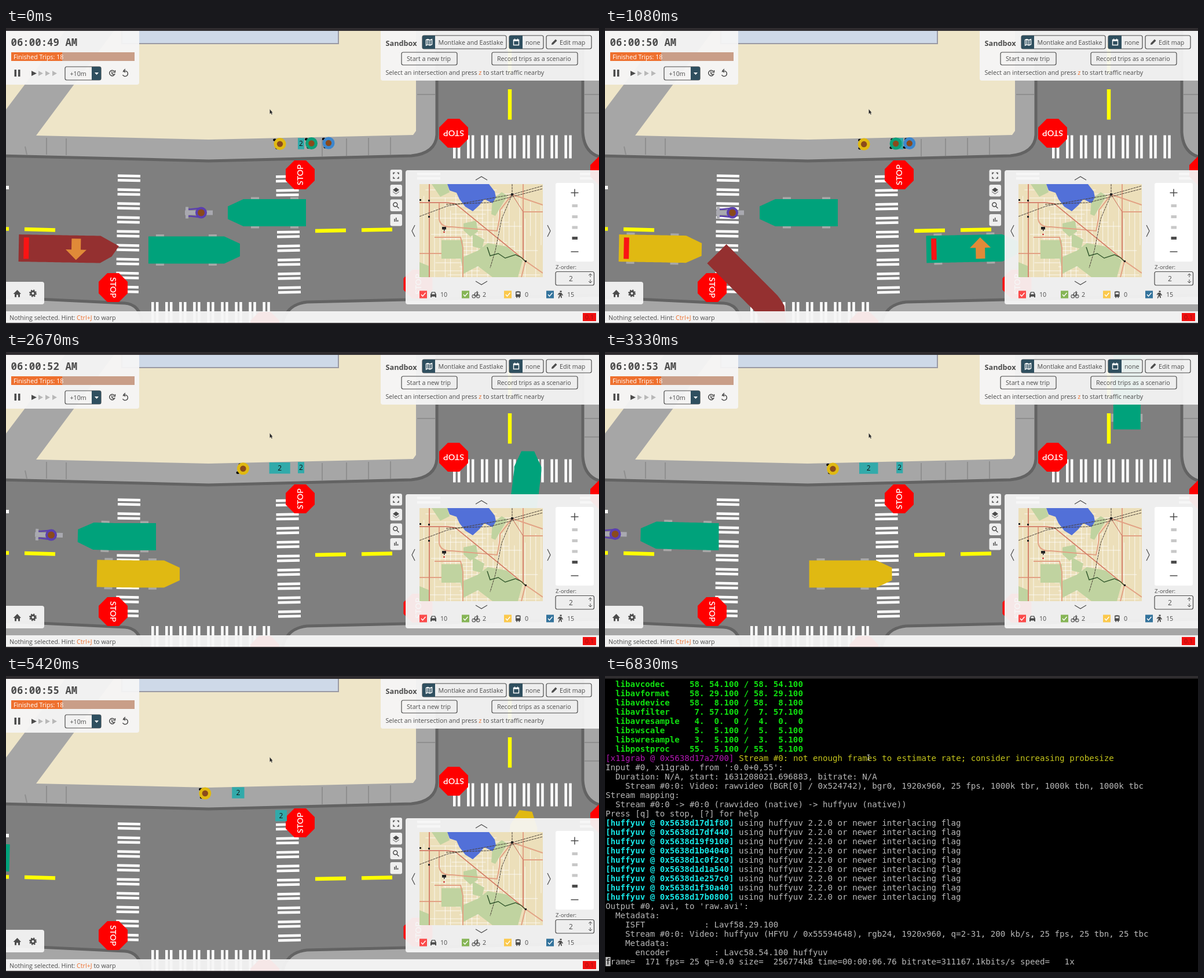
An HTML page for the animation above (7.01 s loop, 1024 by 512 pixels).

```html
<!DOCTYPE html>
<html lang="en">
<head>
<meta charset="utf-8">
<title>Traffic sandbox</title>
<style>
html, body { margin: 0; width: 100%; height: 100%; overflow: hidden; background: #000; }
svg { display: block; width: 100vw; height: 100vh; }
text { font: 10.7px "Open Sans", "Noto Sans", sans-serif; fill: #4c4c4c; white-space: pre; }
.mono { font: 600 17.4px "Noto Sans Mono", "DejaVu Sans Mono", monospace; }
.stop { font: 600 14.2px Lato, "Open Sans", sans-serif; fill: #fff; text-anchor: middle; }
.count { font-size: 12px; fill: #111; text-anchor: middle; }
.hot { fill: #ee702e; }
.panel { fill: #f6f6f6; fill-opacity: .94; }
.box { fill: none; stroke: #4c4c4c; stroke-width: 1.2; }
.teal { fill: #2f4f5f; }
.line { fill: none; stroke: #4c4c4c; stroke-width: 1.5; }
.white { fill: none; stroke: #fff; stroke-width: 1.4; }
.ink { fill: #4c4c4c; }
.walk { fill: #a6a6a6; stroke: #636363; stroke-width: 5; }
#term text { font: 14.17px "DejaVu Sans Mono", monospace; fill: #b8b8b8; }
#term .g { font-weight: 700; fill: #10e010; }
#term .c { font-weight: 700; fill: #18e6e6; }
#term .m { fill: #b218b2; }
#term .y { fill: #c4c41c; }
</style>
</head>
<body>
<svg viewBox="0 0 1024 512">
<g id="app">
  <rect width="1024" height="512" fill="#7f7f7f"/>
  <path class="walk" d="M-5 221L350 230L700 221Q742 217 744 185V-5H-5Z"/>
  <path class="walk" d="M1030 224Q998 218 996 180V-5H1030Z"/>
  <path class="walk" d="M-5 466L205 476Q235 478 236 520H-5Z"/>
  <path class="walk" d="M1030 462L520 474Q480 478 476 520H1030Z"/>
  <path d="M70 190V219M104 191V220M33 205L36 219M546 192V222M588 191V221M626 190V220M664 189V219M710 115H741M999 147H1024M999 115H1024" stroke="#8f8f8f" stroke-width="2"/>
  <path d="M187 4L52 186L350 193L703 185L708 178V4ZM0 4H103L0 141Z" fill="#eee5c8"/>
  <path d="M200 0H574V27H200Z" fill="#ced9e8" stroke="#9a9aa4" stroke-width="2"/>
  <g id="marks"></g>
  <g id="signs"></g>
  <g id="moving"></g>
  <path d="M455.500 140.500V148.500L457.300 147L458.600 149.800L459.800 149.200L458.700 146.500H460.500Z" fill="#222" stroke="#bbb" stroke-width=".3"/>

  <!-- clock and speed -->
  <path class="panel" d="M0 5H230V94Q230 98 226 98H0Z"/>
  <text id="clock" class="mono" x="8.500" y="30.500"></text>
  <rect x="9" y="42" width="213" height="15" fill="#c99e88"/>
  <rect x="9" y="42" width="88" height="15" fill="#ee702e"/>
  <text x="13" y="53.500" style="fill:#fff">Finished Trips: 18</text>
  <path class="ink" d="M14.500 72H18V84H14.500ZM21 72H24.500V84H21ZM44 74L53 78.500L44 83Z"/>
  <path d="M56 74L64 78.500L56 83ZM68 74L76 78.500L68 83ZM80 74L88 78.500L80 83Z" fill="#b8b8b8"/>
  <rect class="box" x="102" y="67" width="62" height="23" rx="3"/>
  <path class="teal" d="M148 67H161Q164 67 164 70V87Q164 90 161 90H148Z"/>
  <path d="M153 77H160L156.500 81Z" fill="#fff"/>
  <text x="110.500" y="82.500">+10m</text>
  <path class="line" d="M187 75A4.700 4.700 0 1 0 188 79M183 75V79L186 80.500M188.500 73V76.500H185M202 76A4.700 4.700 0 1 1 201.500 81M206 71L203 74L206 77"/>

  <!-- sandbox controls -->
  <path class="panel" d="M647 5H1024V91H651Q647 91 647 87Z"/>
  <text x="655.500" y="31" style="font-size:12.700px;font-weight:700">Sandbox</text>
  <g class="box">
    <rect x="719" y="13" width="145" height="23" rx="3"/><rect x="869" y="13" width="59" height="23" rx="3"/>
    <rect x="933" y="13" width="78" height="23" rx="3"/><rect x="683" y="42" width="96" height="22" rx="3"/>
    <rect x="839" y="42" width="148" height="22" rx="3"/>
  </g>
  <path class="teal" d="M741 13H722Q719 13 719 16V33Q719 36 722 36H741ZM892 13H872Q869 13 869 16V33Q869 36 872 36H892Z"/>
  <path class="white" d="M725.500 20.500L728.500 19.500L732 21L735.500 19.500V28.500L732 30L728.500 28.500L725.500 30ZM728.500 19.500V28.500M732 21V30M876.500 20.500H885.500V29.500H876.500ZM876.500 22H885.500M878.500 18.500V21M883.500 18.500V21"/>
  <path class="ink" d="M942 29L942.500 26L949 19.500L951.500 22L945 28.500Z"/>
  <text x="746.500" y="28.500">Montlake and Eastlake</text>
  <text x="897" y="28.500">none</text>
  <text x="956" y="28.500">Edit map</text>
  <text x="692" y="57">Start a new trip</text>
  <text x="848" y="57">Record trips as a scenario</text>
  <text x="655.500" y="81">Select an intersection and press <tspan class="hot">z</tspan> to start traffic nearby</text>

  <!-- map tools -->
  <g id="tools" class="panel"></g>
  <path class="line" d="M669 253V250.500H671.500M675.500 250.500H678V253M678 257.500V260H675.500M671.500 260H669V257.500M675 308.500L678.500 312M671 335V330M673.700 335V328M676.500 335V332"/>
  <circle class="line" cx="672.300" cy="305.500" r="3.500"/>
  <path class="ink" d="M673.500 276L679 280L673.500 284L668 280ZM668 282.500L673.500 286.500L679 282.500V283.500L673.500 287.500L668 283.500Z"/>

  <!-- minimap -->
  <path class="panel" d="M1024 246H694Q690 246 690 250V474Q690 478 694 478H1024Z"/>
  <clipPath id="mapBox"><rect x="714" y="270" width="213" height="161"/></clipPath>
  <g clip-path="url(#mapBox)" fill="none">
    <rect x="714" y="270" width="213" height="161" fill="#ecdfba"/>
    <path id="streets" stroke="#fff" stroke-width="1" stroke-opacity=".75"/>
    <path fill="#c0d3a0" d="M752 367H789V399H752ZM790 338L812 333L815 352L802 361L790 350ZM735 270H762L766 284L750 292ZM785 398L815 385L832 372L865 378L892 402L884 431H840L815 412L790 425ZM840 296L856 284L866 290L845 325L838 322ZM714 405L731 412V431H714ZM806 355L826 366L822 382L806 378Z"/>
    <path fill="#5270d8" d="M762 270L766 281L778 285L783 296L793 309L806 317L817 307L826 296L840 303L846 293L844 283L834 270Z"/>
    <path stroke="#e2a184" stroke-width="2" d="M714 302H762L776 304L897 403L927 424M731 270V431M893 270V400M748 302V330Q750 345 770 344L848 351Q853 330 853 315L874 288L927 306M740 362H785L789 380V431M714 390H752M893 318H927M897 403L890 431"/>
    <path stroke="#c86858" stroke-width="1" d="M714 302H762L776 304L897 403M731 270V431M874 288L893 318V400"/>
    <path stroke="#4a4038" stroke-width="1" stroke-dasharray="4 1" d="M714 326L762 308L874 288L927 273M760 305L835 302L927 278M874 270V288L856 330L845 385L836 415"/>
    <path stroke="#355a2f" stroke-width="1.500" d="M831 379L836 394L850 390L862 398L880 392L890 397L897 404"/>
    <path fill="#222" d="M714 296H717V299H714ZM729 297H732V300H729ZM729 325H732V328H729ZM872 286H876V290H872ZM896 402H899V405H896ZM753 344H760V348.500H757.500V351H756V348.500H753Z"/>
    <circle id="agent" cx="756.500" r="1.300" fill="#c62020"/>
  </g>
  <path class="line" style="stroke-width:1.200" d="M811 263L821 257L831 263M811 438L821 444L831 438M706 341L701 351L706 361M935 341L940 351L935 361"/>
  <rect x="949" y="268" width="66" height="136" rx="3" fill="#fff"/>
  <path class="line" d="M975.500 285H988.500M982 278.500V291.500M975.500 387H988.500"/>
  <path fill="#c8c8c8" d="M977.500 305H987V310H977.500ZM977.500 324H987V329H977.500ZM977.500 342.500H987V347.500H977.500Z"/>
  <path class="ink" d="M977.500 361H987V366H977.500Z"/>
  <text x="949" y="417" style="font-size:9.700px">Z-order:</text>
  <rect class="box" x="949" y="421.500" width="66.500" height="23.500" rx="3"/>
  <text x="972" y="437.500" style="font-size:12px">2</text>
  <path class="line" style="stroke-width:1" d="M1006 428L1009 425L1012 428M1009 425V431M1006 438L1009 441L1012 438M1009 435V441"/>
  <g id="modes"></g>
  <path class="ink" d="M733 461L735 456.500H741L743 461V466H741V464.500H735V466H733ZM880 456Q884 454.500 888.500 456V465H887V467H885.500V465H883V467H881.500V465H880ZM956.500 454.500H959.500V457H956.500ZM955 458H959L962 462L961 463L959 461L960 467H958.500L957 463L955 467.500H953.500L955.500 462V460L953.500 462L952.500 461Z"/>
  <path d="M881.500 457.500H887V460.500H881.500ZM735 460.500L736 457.700H740L741 460.500Z" fill="#eee"/>
  <path class="line" style="stroke-width:1.100" d="M808 464L810 458H815L811 464L809 460M815 464L813 456H815M805 464A2.800 2.800 0 1 0 810.600 464A2.800 2.800 0 1 0 805 464M812.400 464A2.800 2.800 0 1 0 818 464A2.800 2.800 0 1 0 812.400 464"/>

  <!-- corner and status bar -->
  <path class="panel" d="M0 439H62Q66 439 66 443V474Q66 478 62 478H0Z"/>
  <path class="ink" d="M12.500 460L19.500 453L26 460H24V465.500H21V461.500H18V465.500H15V460Z"/>
  <circle cx="46.500" cy="459" r="3.500" fill="none" stroke="#4c4c4c" stroke-width="2.800"/>
  <circle cx="46.500" cy="459" r="5.500" fill="none" stroke="#4c4c4c" stroke-width="2" stroke-dasharray="2.300 2.020"/>
  <rect class="panel" y="490" width="1024" height="20"/>
  <text x="6" y="505">Nothing selected. Hint: <tspan class="hot">Ctrl+J</tspan> to warp</text>
  <rect x="996" y="493" width="23" height="14" fill="#f01010"/>
  <text x="1000" y="504" style="fill:#a01010">0.1</text>
  <path d="M0 0H1024V5H0ZM0 510H1024V512H0Z" fill="#2f2c2f"/>
</g>
<g id="term">
  <rect width="1024" height="512"/>
  <rect width="1024" height="4.500" fill="#302e30"/>
  <g id="rows"></g>
  <rect x="1" y="486" width="8.600" height="16" fill="#b8b8b8"/>
  <text x="1" y="498.500" style="fill:#000">f</text>
  <path d="M453 136.500H457M455 136.500V145M453 145H457" stroke="#ddd" fill="none"/>
</g>
</svg>
<script>
const $ = id => document.getElementById(id);
const LOOP = 7010, TERMINAL = 79, REFRESH = 82;   // ticks are 1/12 s
const tickStart = k => Math.round(k * 25 / 3) * 10;
const range = n => [...Array(n).keys()];

// ---- static repeats ----
const bar = (x, y, w, h, turn = 0) =>
  `<rect x="${x}" y="${y}" width="${w}" height="${h}" fill="#fff" transform="rotate(${turn} ${x} ${y})"/>`;
const dash = d => `<path d="${d}" stroke="#ff0" stroke-width="6.500"/>`;
let marks = bar(0, 273, 5, 6);
for (const i of range(9)) for (const j of [0, 1]) {
  const step = 24.050 * i + 7.900 * j;
  marks += bar(193 - i * .38, 253.200 + step, 39, 4.500, 1) + bar(466 + i * .5, 254.900 + step, 39, 4.500, -1);
  marks += bar(772 + step, 185.500, 4.500, 40) + bar(251 + step, 474, 4.500, 40);
  if (i < 1) marks += bar(991, 250 + step, 40, 4.500) + bar(710, 250 + step, 40, 4.500);
}
marks += dash('M0 347.500H5M32 348L85 349.500M534 351L587 350M614 349.500L667 348.500M870 106V158.500M870 25V79');
$('marks').innerHTML = marks;

$('signs').innerHTML = [[508, 254, -90], [185, 449, 90], [773, 182, 180], [711.500, 443, -90], [447, 516, 0], [1034, 247, 90]]
  .map(([x, y, a]) => `<g transform="translate(${x} ${y}) rotate(${a})">
    <path d="M-10 -25H10L25 -10V10L10 25H-10L-25 10V-10Z" fill="#f00"/><text class="stop" y="5">STOP</text></g>`).join('');

$('tools').innerHTML = [245, 271, 296.500, 322]
  .map(y => `<rect x="663.500" y="${y}" width="20.500" height="20.500" rx="3"/>`).join('');

$('modes').innerHTML = [[714, '#fb4a4a', 10], [787, '#86b556', 2], [860, '#fbc94c', 0], [933, '#33739c', 15]]
  .map(([x, c, n]) => `<rect x="${x}" y="454.500" width="13" height="13" fill="${c}"/>
    <path class="white" d="M${x + 3} 461L${x + 5.500} 464L${x + 10.500} 458"/><text x="${x + 36}" y="465">${n}</text>`).join('');

let seed = 5;
const rnd = () => (seed = seed * 16807 % 2147483647) / 2147483647;
$('streets').setAttribute('d', range(46).map(i => {
  const len = 50 + 110 * rnd();
  return i % 2 ? `M${717 + i * 4.600} ${270 + 70 * rnd()}v${len}` : `M${714 + 110 * rnd()} ${273 + i * 3.500}h${len}`;
}).join(''));

// ---- motion helpers ----
// monotone cubic through [tick, value] keys
function curve(...p) {
  const slope = i => (p[i + 1][1] - p[i][1]) / (p[i + 1][0] - p[i][0]);
  const tangent = i => {
    if (!i) return slope(0);
    if (i == p.length - 1) return slope(i - 1);
    const a = slope(i - 1), b = slope(i);
    return a * b > 0 ? 2 * a * b / (a + b) : 0;
  };
  return k => {
    let i = 0;
    while (i < p.length - 2 && k > p[i + 1][0]) i++;
    const [t0, a] = p[i], [t1, b] = p[i + 1], d = t1 - t0, u = (k - t0) / d, v = 1 - u;
    if (u > 1) return b + slope(i) * (k - t1);
    return a * v * v * (1 + 2 * u) + b * u * u * (3 - 2 * u) + d * u * v * (tangent(i) * v - tangent(i + 1) * u);
  };
}
function at(path, s) {
  for (let i = 1; ; i++) {
    const [x, y] = path[i - 1], dx = path[i][0] - x, dy = path[i][1] - y, d = Math.hypot(dx, dy);
    if (s <= d || i == path.length - 1) return [x + dx * s / d, y + dy * s / d];
    s -= d;
  }
}
function pose(path, s) {
  const [a, b] = at(path, s - 8), [c, d] = at(path, s + 8), [x, y] = at(path, s);
  return { x, y, a: Math.atan2(d - b, c - a) };
}
const place = ({ x, y, a }, inner) =>
  `<g transform="translate(${x} ${y}) rotate(${a * 180 / Math.PI})">${inner}</g>`;

// ---- traffic ----
const west = [[800, 319.500], [190, 319.500], [0, 314.500], [-300, 306]];
const lane = [[-200, 376.500], [186, 383.500]];
const north = [...lane, [230, 384], [500, 384], [800, 378], [860, 350], [890, 295], [901, 205], [903, -400]];
const south = [...lane, [282, 480], [312, 530], [320, 900]];
const east = f => k => f(k) + 200;
const westX = (...keys) => { const f = curve(...keys); return k => 800 - f(k); };

const buses = [
  { path: west, len: 135, fill: '#00a27b', tail: westX([0, 518], [13, 402], [23, 327], [32, 259], [48, 134], [65, 6], [78, -92]) },
  { path: north, len: 158, fill: '#00a27b', brake: [8, 19], arrow: [6, 26, -1],
    tail: east(curve([0, 246], [13, 555], [23, 660], [32, 895], [36, 992], [48, 1290])) },
  { path: south, len: 168, fill: '#943030', brake: [0, 2], arrow: [0, 5, 1],
    tail: east(curve([0, 22], [2, 22], [7, 62], [13, 196], [18, 345], [23, 490])) },
  { path: north, len: 143, fill: '#e0b912', brake: [6, 24],
    tail: east(curve([0, -149], [13, 24], [23, 47], [32, 157], [48, 563], [65, 848], [72, 1021], [78, 1170])) },
];
const during = (span, k) => span && k >= span[0] && k < span[1];

function drawBus({ path, len, fill, tail, brake, arrow }, k) {
  const s = tail(k), left = [], right = [];
  const edge = (u, h) => {
    const { x, y, a } = pose(path, s + u), dx = Math.sin(a) * h, dy = Math.cos(a) * h;
    left.push([x + dx, y - dy]);
    right.unshift([x - dx, y + dy]);
  };
  for (const i of range(25)) edge((len - 27) * i / 24, 23.500);
  edge(len, 11);
  const straight = Math.cos(pose(path, s + len).a - pose(path, s).a) > .99;
  const wheel = u => place(pose(path, s + u), '<path d="M-7 -27H7V27H-7Z" fill="#a8a8a8"/>');
  let out = straight ? wheel(20) + wheel(len - 47) : '';
  out += `<polygon points="${left.concat(right).join(' ')}" fill="${fill}"/>`;
  if (during(brake, k)) out += place(pose(path, s + 13), '<path d="M-4.500 -18.500H4.500V18.500H-4.500Z" fill="#fa1414"/>');
  if (during(arrow, k)) out += place(pose(path, s + len * .59),
    `<path d="M0 19L18 1H8V-18H-8V1H-18Z" fill="#e08a38" transform="scale(1 ${arrow[2]})"/>`);
  return out;
}

const bikePos = westX([0, 337], [13, 220], [23, 146], [32, 78], [48, -43]);
const drawBike = k => place(pose(west, bikePos(k)), `
  <path d="M-20 -4H28V4H-20ZM22 -10H27V10H22Z" fill="#a9a9b0"/>
  <path d="M0 -8L18 -6L22 -6M0 8L18 6L22 6" stroke="#5b3fae" stroke-width="2.500" fill="none"/>
  <circle r="10" fill="#5b3fae"/><circle r="6" fill="#8a4a1c"/>`);

const walkY = x => 199 + (556 - x) * .019;
function drawPed(x, fill, k) {
  const y = walkY(x), swing = 2 * Math.sin(k * 1.100 + x * .01);
  const foot = side => `<ellipse cx="${x - 7 + side * swing}" cy="${y - 7 * side}" rx="2.800" ry="2.200"/>`;
  return foot(1) + foot(-1) + `<circle cx="${x}" cy="${y}" r="10.500" fill="${fill}"/>
    <circle cx="${x}" cy="${y}" r="5.200" fill="#8a4a1c"/>`;
}
const crowd = (x, y, w, n) =>
  `<rect x="${x - w / 2}" y="${y - 9.700}" width="${w}" height="19.400" fill="#32aaaa"/><text class="count" x="${x}" y="${y + 4.300}">${n}</text>`;
const pairX = curve([0, 509.500], [38, 509.500], [48, 497.500], [57, 479], [65, 475], [79, 475]);
const pairY = curve([0, 200], [48, 200], [57, 213], [65, 241.500], [79, 275]);
const pairW = curve([0, 11], [38, 11], [48, 13.500], [57, 18], [65, 20], [79, 20]);

function drawPeds(k) {
  const t = k / 12, green = 527.500 - 23.400 * t, blue = 557 - 28.800 * t;
  let out = crowd(pairX(k), pairY(k), pairW(k), k >= 19 && k < 29 ? 3 : 2);
  if (k < 29) out += drawPed(green, '#0d9f78', k);
  else out += crowd((green + blue) / 2, walkY(green), blue - green + 21, 2);
  if (k < 19) out += drawPed(blue, '#3d86cc', k);
  return out + drawPed(473 - 23.850 * t, '#e0b912', k);
}

// ---- terminal ----
const libs = [['avcodec', 58, 54], ['avformat', 58, 29], ['avdevice', 58, 8], ['avfilter', 7, 57], ['avresample', 4, 0, 0],
  ['swscale', 5, 5], ['swresample', 3, 5], ['postproc', 55, 5]];
const version = ([, a, b, c = 100]) => `${a}.`.padStart(3) + `${b}.`.padStart(4) + `${c}`.padStart(3);
const span = (c, s) => `<tspan class="${c}">${s}</tspan>`;
const rows = [
  ...libs.map(l => span('g', '  ' + ('lib' + l[0]).padEnd(15) + version(l) + ' / ' + version(l))),
  span('m', '[x11grab @ 0x5638d17a2700] ') + span('y', 'Stream #0: not enough frames to estimate rate; consider increasing probesize'),
  "Input #0, x11grab, from ':0.0+0,55':",
  '  Duration: N/A, start: 1631208021.696883, bitrate: N/A',
  '    Stream #0:0: Video: rawvideo (BGR[0] / 0x524742), bgr0, 1920x960, 25 fps, 1000k tbr, 1000k tbn, 1000k tbc',
  'Stream mapping:',
  '  Stream #0:0 -&gt; #0:0 (rawvideo (native) -&gt; huffyuv (native))',
  'Press [q] to stop, [?] for help',
  ...'7d1f80 7df440 9f9100 b04040 c0f2c0 d1a540 e257c0 f30a40 7b0800'.split(' ').map(a =>
    span('c', `[huffyuv @ 0x5638d1${a}]`) + ' using huffyuv 2.2.0 or newer interlacing flag'),
  "Output #0, avi, to 'raw.avi':",
  '  Metadata:',
  '    ISFT            : Lavf58.29.100',
  '    Stream #0:0: Video: huffyuv (HFYU / 0x55594648), rgb24, 1920x960, q=2-31, 200 kb/s, 25 fps, 25 tbn, 25 tbc',
  '    Metadata:',
  '      encoder         : Lavc58.54.100 huffyuv',
  '',
];
$('rows').innerHTML = rows.map((r, i) => `<text x="1" y="${18.500 + 16 * i}">${r}</text>`).join('');
const progress = $('rows').lastChild;
function status(frames, rate) {
  const sec = frames / 25 - .08, size = Math.round(rate * sec * 1000 / 8192);
  return `frame=${String(frames).padStart(5)} fps= 25 q=-0.0 size=${String(size).padStart(8)}kB ` +
    `time=00:00:0${sec.toFixed(2)} bitrate=${rate}kbits/s speed=   1x`;
}

// ---- loop ----
let shown = -1;
function render(k) {
  const term = k >= TERMINAL;
  $('term').style.display = term ? '' : 'none';
  $('app').style.display = term ? 'none' : '';
  if (term) {
    progress.textContent = k < REFRESH ? status(158, 311072.8) : status(171, 311167.1);
    return;
  }
  $('clock').textContent = `06:00:${49 + Math.floor((k + 10) / 12)} AM`;
  $('agent').setAttribute('cy', 353 + 4 * Math.abs(Math.sin(k / 9)));
  $('moving').innerHTML = buses.map(b => drawBus(b, k)).join('') + drawBike(k) + drawPeds(k);
}
function frame() {
  const t = performance.now() % LOOP;
  let k = Math.floor(t * 12 / 1000) + 1;
  while (tickStart(k) > t) k--;
  if (k != shown) render(shown = k);
  requestAnimationFrame(frame);
}
frame();
</script>
</body>
</html>
```
